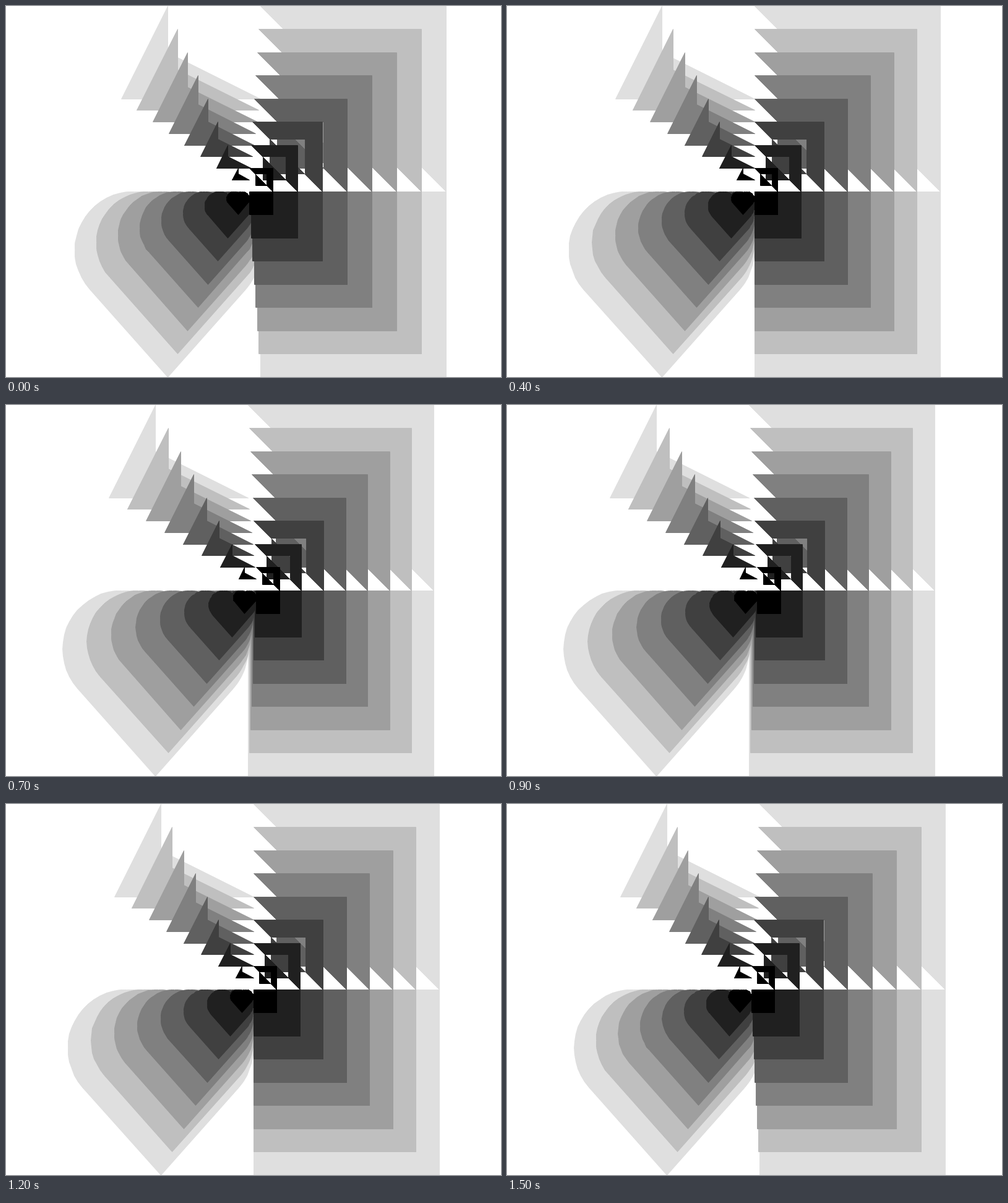
Recreate the animation shown at these times as an HTML page. Size 800 by 600 pixels, loop 1600 ms.

```html
<!DOCTYPE html>
<html lang="en">
<head>
<meta charset="utf-8">
<title>Stacked shapes</title>
<style>
  html, body { margin: 0; width: 100%; height: 100%; overflow: hidden; background: #fff; }
  svg { display: block; width: 800px; height: 600px; }
  path { fill-rule: evenodd; stroke-width: .96; stroke-linejoin: round; shape-rendering: crispEdges; }
</style>
</head>
<body>
<svg id="stage" viewBox="0 0 800 600"></svg>
<script>
const LAYERS = 8, UNIT = 37.5, LOOP = 1600, STEP = 100;
const stage = document.getElementById('stage');

// Shapes in unit coordinates around the layer's centre
const square = [[0, 0], [1, 0], [1, 1], [0, 1]];
const dart = [[-.5, -1], [-.5, -.75], [0, -.5], [-.75, -.5]];
const corner = [[0, -1], [1, -1], [1, 0]];
const hole = [[.25, -.75], [.75, -.75], [.75, -.25], [.25, -.25]];
const shapes = [square, heart(.3167), dart, corner, hole];

function heart(r) {
  const dx = .5 - r, dy = 1 - r;
  const slope = Math.atan2(dx, dy) + Math.asin(r / Math.hypot(dx, dy));
  const from = Math.PI - slope, to = 2 * Math.PI - Math.acos(dx / r);
  const left = [], steps = 24;
  for (let i = 0; i <= steps; i++) {
    const a = from + (to - from) * i / steps;
    left.push([r - 1 + r * Math.cos(a), r + r * Math.sin(a)]);
  }
  const right = left.slice(0, -1).reverse().map(([x, y]) => [-1 - x, y]);
  return [[-.5, 1], ...left, ...right];
}

const layers = [];
for (let n = LAYERS; n > 0; n--) {
  const path = document.createElementNS('http://www.w3.org/2000/svg', 'path');
  const v = Math.round(255 * (n - 1) / LAYERS);
  path.style.fill = path.style.stroke = `rgb(${v},${v},${v})`;
  stage.append(path);
  layers.push({ n, path });
}

const snap = v => Math.floor(v + 1e-6) + .5;

function outline(points, cx, size) {
  return 'M' + points.map(([x, y]) => `${snap(cx + x * size)} ${snap(300 + y * size)}`).join('L') + 'Z';
}

function draw(t) {
  const sway = Math.abs(t - LOOP / 2) / (LOOP / 4) - 1;
  for (const { n, path } of layers) {
    const cx = 400 + 2.5 * (n - 3.5) * sway;
    path.setAttribute('d', shapes.map(s => outline(s, cx, n * UNIT)).join(''));
  }
}

const start = performance.now();
let last = -1;
function tick() {
  const t = Math.floor((performance.now() - start) % LOOP / STEP) * STEP;
  if (t !== last) draw(last = t);
  requestAnimationFrame(tick);
}
tick();
</script>
</body>
</html>
```
